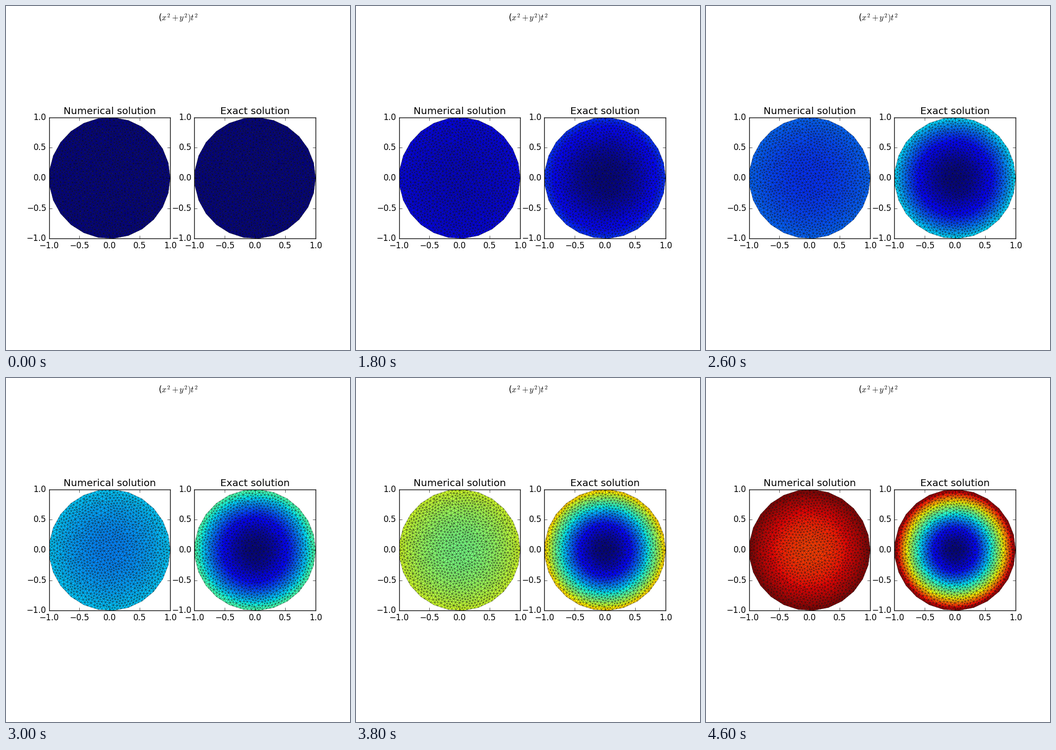
Recreate the animation shown at these times as a matplotlib script. Size 700 px wide and 700 px high, loop 4800 ms.

```python
import numpy as np
import matplotlib.pyplot as plt
from matplotlib.animation import FuncAnimation
from matplotlib.tri import Triangulation

plt.style.use("classic")
plt.rcParams["font.family"] = "DejaVu Sans"

FRAMES, INTERVAL = 24, 200
SIDES, CUTS = 25, 4
SPACING = 0.038


def rim_points():
    """Evenly cut sides of the regular polygon."""
    a = 2 * np.pi * np.arange(SIDES) / SIDES
    corner = np.column_stack([np.cos(a), np.sin(a)])
    following = np.roll(corner, -1, axis=0)
    return np.concatenate([corner + (following - corner) * k / CUTS
                           for k in range(CUTS)])


def triangulate(pts):
    """Delaunay triangles without the flat slivers along the rim."""
    tri = Triangulation(pts[:, 0], pts[:, 1]).triangles
    p, q, r = (pts[tri[:, i]] for i in range(3))
    u, v = q - p, r - p
    area = 0.5 * np.abs(u[:, 0] * v[:, 1] - u[:, 1] * v[:, 0])
    return Triangulation(pts[:, 0], pts[:, 1], tri[area > 1e-5])


def disc_mesh(seed=4, tries=20000):
    rng = np.random.default_rng(seed)
    rim = rim_points()
    a = 2 * np.pi * (np.arange(SIDES) + 0.5) / SIDES
    normals = np.array([np.cos(a), np.sin(a)])
    limit = np.cos(np.pi / SIDES) - 0.03

    cand = rng.uniform(-1, 1, (tries, 2))
    cand = cand[(cand @ normals).max(axis=1) < limit]
    pts = np.empty((len(rim) + len(cand), 2))
    n = len(rim)
    pts[:n] = rim
    for c in cand:
        if ((pts[:n] - c) ** 2).sum(axis=1).min() > SPACING ** 2:
            pts[n] = c
            n += 1
    pts = pts[:n]

    # One step of Laplacian smoothing for the inner points
    i, j = triangulate(pts).edges.T
    total, count = np.zeros_like(pts), np.zeros(n)
    for s, t in ((i, j), (j, i)):
        np.add.at(total, s, pts[t])
        np.add.at(count, s, 1)
    inner = slice(len(rim), n)
    pts[inner] = total[inner] / count[inner, None]
    return triangulate(pts)


mesh = disc_mesh()
r2 = (mesh.x ** 2 + mesh.y ** 2)[mesh.triangles].mean(axis=1)
r2 /= r2.max()  # the outermost face reaches the top of the colour scale


def numerical(t):
    return 0.845 * t ** 2.95 + 0.155 * t ** 2 * r2


def exact(t):
    return t ** 2 * r2


fig, axes = plt.subplots(1, 2, figsize=(7, 7), dpi=100, facecolor="white")
fig.suptitle("($x^2+y^2)t^2$")


def panel(ax, title):
    ax.set_title(title)
    surface = ax.tripcolor(mesh, facecolors=np.zeros_like(r2), cmap="jet",
                           vmin=0, vmax=1, edgecolors="k")
    ax.set_aspect("equal")
    ax.set(xlim=(-1, 1), ylim=(-1, 1))
    ticks = np.linspace(-1, 1, 5)
    ax.set_xticks(ticks)
    ax.set_yticks(ticks)
    return surface


surfaces = [(panel(axes[0], "Numerical solution"), numerical),
            (panel(axes[1], "Exact solution"), exact)]


def update(n):
    t = (n + 1) / FRAMES
    for surface, solution in surfaces:
        surface.set_array(solution(t))
    return [s for s, _ in surfaces]


anim = FuncAnimation(fig, update, frames=FRAMES, interval=INTERVAL,
                     repeat=True, blit=False)
plt.show()
```
